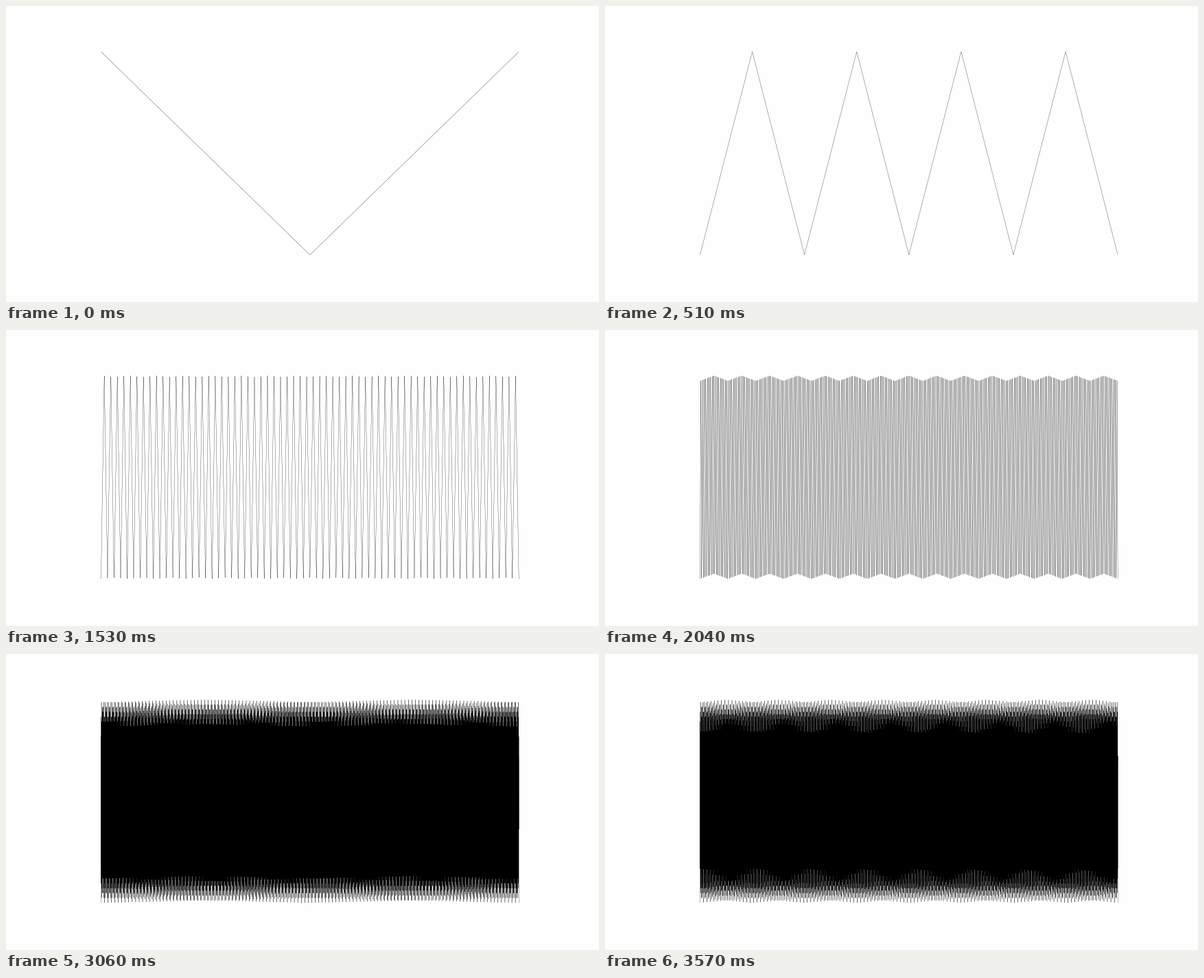
Animation, 864 px wide and 432 px high, one loop 4.08 s. Source, as an HTML page with a canvas:

```html
<!DOCTYPE html>
<html lang="en">
<head>
<meta charset="utf-8">
<title>Triangle wave at rising frequency</title>
<style>
  html, body { margin: 0; width: 100%; height: 100%; overflow: hidden; background: #fefefe; }
  canvas { display: block; }
</style>
</head>
<body>
<canvas id="plot" width="864" height="432"></canvas>
<script>
const W = 864, H = 432;
const STEP = 510, STEPS = 8;
const SAMPLES = 10000;
const LINE = 0.3;
const TOLERANCE = (1 / 9) ** 2;
const PAPER = 254;
const LEFT = 138.436, WIDTH = 608.727, BOTTOM = 363.175, HEIGHT = 296.509;

const ctx = document.getElementById('plot').getContext('2d');

// Triangle wave with 4^k teeth; the first step is a single V.
function wave(k) {
  const points = [];
  for (let i = 0; i < SAMPLES; i++) {
    const x = i / (SAMPLES - 1);
    const v = Math.abs(2 * (x * 4 ** k % 1) - 1);
    points.push([LEFT + x * WIDTH, BOTTOM - (k ? 1 - v : v) * HEIGHT]);
  }
  return points;
}

// Merge runs of points that stay close to one straight line.
function simplify(points) {
  const out = [points[0]];
  let last = points[0], start, far, back, dx, dy, norm, farMax, backMax, atFar, atBack;

  function begin(p) {
    start = out[out.length - 1];
    dx = p[0] - last[0];
    dy = p[1] - last[1];
    norm = farMax = dx * dx + dy * dy;
    backMax = 0;
    atFar = true;
    atBack = false;
    far = last = p;
  }

  function flush() {
    if (!backMax) out.push(far);
    else if (atFar) out.push(back, far);
    else out.push(far, back);
    if (!atFar && !atBack) out.push(last);
  }

  begin(points[1]);
  for (const p of points.slice(2)) {
    const tx = p[0] - start[0], ty = p[1] - start[1];
    const dot = dx * tx + dy * ty;
    const along = dot * dot / norm;
    const cross = dx * ty - dy * tx;
    if (cross * cross / norm >= TOLERANCE) {
      flush();
      begin(p);
      continue;
    }
    atFar = dot > 0 && along > farMax;
    atBack = dot <= 0 && along > backMax;
    if (atFar) { farMax = along; far = p; }
    if (atBack) { backMax = along; back = p; }
    last = p;
  }
  flush();
  return out;
}

// Thin strokes add up their pixel coverage until the pixel is black.
function render(points) {
  const ink = new Float32Array(W * H);
  for (let i = 1; i < points.length; i++) {
    const [x0, y0] = points[i - 1], [x1, y1] = points[i];
    const dx = x1 - x0, dy = y1 - y0, rise = Math.abs(dy);
    if (!rise) continue;
    const span = Math.min(LINE * Math.hypot(dx, dy) / rise, LINE + Math.abs(dx));
    const n = Math.ceil(rise * 4);
    const weight = rise / n;
    for (let j = 0; j < n; j++) {
      const f = (j + 0.5) / n;
      const a = x0 + dx * f - span / 2, b = a + span;
      const row = Math.floor(y0 + dy * f) * W;
      for (let c = Math.floor(a); c < b; c++) {
        ink[row + c] += weight * (Math.min(b, c + 1) - Math.max(a, c));
      }
    }
  }
  const image = ctx.createImageData(W, H);
  const pixels = new Uint32Array(image.data.buffer);
  for (let i = 0; i < ink.length; i++) {
    const g = Math.round(PAPER * (1 - Math.min(1, ink[i])));
    pixels[i] = 0xff000000 | g << 16 | g << 8 | g;
  }
  return image;
}

const images = Array.from({ length: STEPS }, (_, k) => render(simplify(wave(k))));
const t0 = performance.now();
let shown = -1;

function draw() {
  const k = Math.floor((performance.now() - t0) / STEP) % STEPS;
  if (k !== shown) ctx.putImageData(images[shown = k], 0, 0);
  requestAnimationFrame(draw);
}
draw();
</script>
</body>
</html>
```
